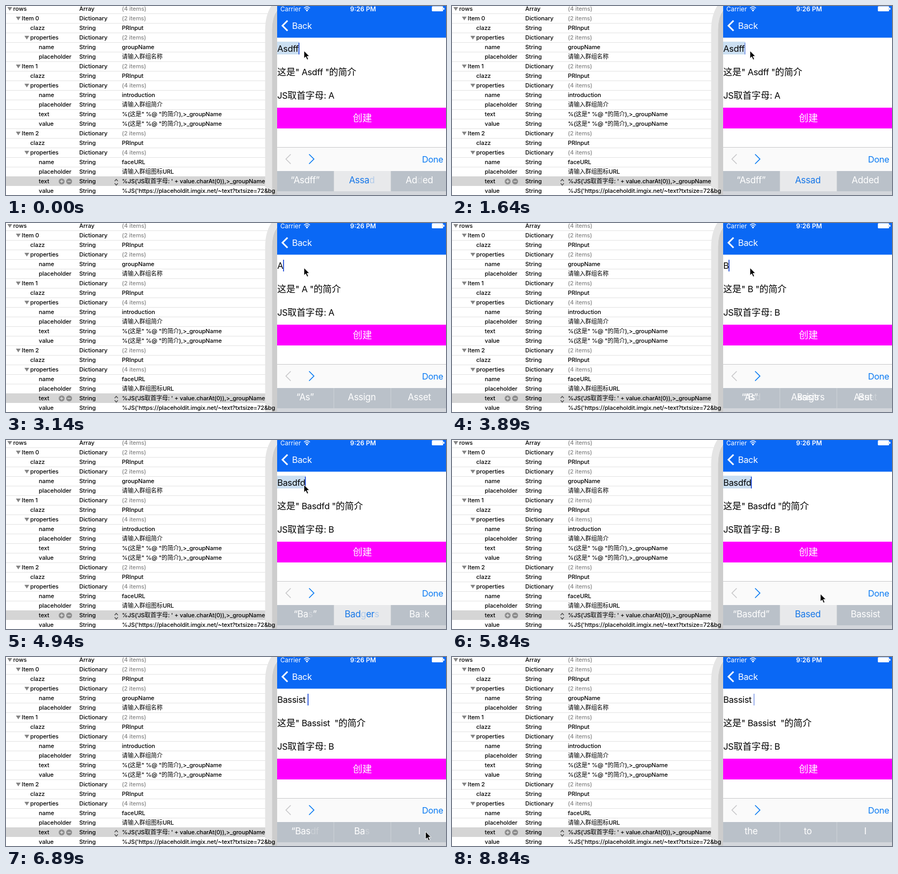
Recreate the animation shown at these times as an HTML page. Size 826 px wide and 355 px high, loop 8.94 s.

```html
<!DOCTYPE html>
<html lang="zh-CN">
<head>
<meta charset="utf-8">
<title>Form editor and live preview</title>
<style>
html, body { margin: 0; width: 100%; height: 100%; overflow: hidden; background: #fff; }
svg { display: block; width: 826px; height: 355px; }
text { font-family: Inter, "Noto Sans CJK SC", "Noto Sans CJK", "Noto Sans", sans-serif; white-space: pre; }
.list text { font-size: 11px; font-weight: 450; letter-spacing: -.1px; fill: #000; }
.list .dim { fill: #858585; }
.body { font-size: 16.4px; letter-spacing: -.3px; fill: #000; }
.word { font-size: 17px; letter-spacing: -.3px; text-anchor: middle; }
.cjk { font-size: 17px; letter-spacing: 0; }
</style>
</head>
<body>
<svg id="stage" viewBox="0 0 826 355" xmlns="http://www.w3.org/2000/svg"></svg>
<script>
const stage = document.getElementById('stage');

function add(tag, attrs, parent = stage, content) {
  const el = document.createElementNS('http://www.w3.org/2000/svg', tag);
  for (const k in attrs) el.setAttribute(k, attrs[k]);
  if (content !== undefined) el.textContent = content;
  parent.appendChild(el);
  return el;
}
const rect = (x, y, width, height, fill, parent) => add('rect', { x, y, width, height, fill }, parent);
const line = (d, stroke, w, parent) => add('path', { d, stroke, 'stroke-width': w, fill: 'none' }, parent);
const label = (x, y, str, attrs, parent) => add('text', { x, y, ...attrs }, parent, str);

// Property list: [depth, key, type, value]
const rows = [
  [0, 'rows', 'Array', '(4 items)'],
  [1, 'Item 0', 'Dictionary', '(2 items)'],
  [2, 'clazz', 'String', 'PRInput'],
  [2, 'properties', 'Dictionary', '(2 items)'],
  [3, 'name', 'String', 'groupName'],
  [3, 'placeholder', 'String', '请输入群组名称'],
  [1, 'Item 1', 'Dictionary', '(2 items)'],
  [2, 'clazz', 'String', 'PRInput'],
  [2, 'properties', 'Dictionary', '(4 items)'],
  [3, 'name', 'String', 'introduction'],
  [3, 'placeholder', 'String', '请输入群组简介'],
  [3, 'text', 'String', '%(这是" %@ "的简介),>_groupName'],
  [3, 'value', 'String', '%(这是" %@ "的简介),>_groupName'],
  [1, 'Item 2', 'Dictionary', '(2 items)'],
  [2, 'clazz', 'String', 'PRInput'],
  [2, 'properties', 'Dictionary', '(4 items)'],
  [3, 'name', 'String', 'faceURL'],
  [3, 'placeholder', 'String', '请输入群组图标URL'],
  [3, 'text', 'String', "%JS('JS取首字母: ' + value.charAt(0)),>_groupName"],
  [3, 'value', 'String', "%JS('https://placeholdit.imgix.net/~text?txtsize=72&bg"]
];
const picked = 18;

function drawList() {
  const g = add('g', { class: 'list' });
  rect(0, 0, 509, 355, '#fff', g);
  rows.forEach((_, i) => {
    const y = 5 + 18 * i;
    if (i === picked) rect(0, y - 9, 509, 18, '#d5d5d5', g);
    else rect(0, y + 9, 509, 1, '#e3e3e3', g);
  });
  // Device edge, under the text
  add('path', { d: 'M499 355V45Q499 22 509 8V355Z', fill: '#cdcdcd' }, g);
  line('M493 355V45Q493 12 511 -6', '#e5e5e5', 13, g);
  rows.forEach(([depth, key, type, value], i) => {
    const y = 5 + 18 * i, x = 13.6 + 16 * depth;
    if (type !== 'String')
      add('path', { d: `M${x - 11} ${y - 3}h9l-4.5 7z`, fill: '#858585' }, g);
    label(x, y + 4, key, {}, g);
    label(137.6, y + 4, type, {}, g);
    label(217.6, y + 4, value, type === 'String' ? {} : { class: 'dim' }, g);
  });
  for (const cx of [104.5, 118.5]) {
    add('circle', { cx, cy: 329.5, r: 5.5, fill: '#8c8c8c' }, g);
    line(`M${cx - 3} 329.5h6` + (cx < 110 ? `M${cx} 326.5v6` : ''), '#e2e2e2', 1.4, g);
  }
  line('M204 329l3-3.5l3 3.5M204 333l3 3.5l3-3.5', '#444', 1.2, g);
}

function drawPhone() {
  rect(509, 0, 317, 355, '#fff');
  rect(509, 0, 317, 59.5, '#0a68f5');
  label(515, 10, 'Carrier', { 'font-size': 11.8, fill: '#fff' });
  label(646, 10, '9:26 PM', { 'font-size': 12, 'font-weight': 600, fill: '#fff' });
  line('M559.5 4Q565 -1 570.5 4M561.6 6.3Q565 3.2 568.4 6.3', '#fff', 1.6);
  add('path', { d: 'M565 10.5l-2.2-2.5q2.2-1.8 4.4 0z', fill: '#fff' });
  add('rect', { x: 799.5, y: .5, width: 21, height: 9.5, rx: 1.5, fill: '#fff' });
  rect(821, 3.5, 2, 3.5, '#fff');
  line('M528.5 27.5L519 37L528.5 46.5', '#fff', 3);
  label(537, 43, 'Back', { class: 'body', style: 'fill:#fff' });
  rect(509, 191, 317, 39, '#f0f');
  label(669, 217, '创建', { 'font-size': 18, 'font-weight': 300, fill: '#fff', 'text-anchor': 'middle' });
  rect(509, 265, 317, 1, '#c9c9cb');
  rect(509, 266, 317, 44, '#fafafa');
  line('M534.5 278.5L525.5 287.5L534.5 296.5', '#c6c6c8', 1.5);
  line('M569 278.5L578 287.5L569 296.5', '#0b7bf3', 1.7);
  label(781, 294, 'Done', { class: 'body', style: 'fill:#0b7bf3' });
  rect(509, 348, 317, 7, '#d3d6db');
}

drawList();
drawPhone();

const mark = rect(509, 67, 0, 24, '#cbdff2');
const lines = [86, 130, 174].map(y => label(509.3, y, '', { class: 'body' }));
const caret = rect(0, 69, 2, 22, '#4166dc');
const cells = [[509, 106, 561.5], [615, 107, 668], [722, 104, 776]].map(([x, w, mid]) => ({
  bg: rect(x, 310, w, 38, '#bac1c9'), g: add('g', {}), mid
}));
rect(615, 310, 1, 38, '#cdd2d7');
rect(722, 310, 1, 38, '#cdd2d7');
const mouse = add('path', {
  d: 'M0 0V14.5L3.4 11.4L5.8 17L8.3 15.9L5.9 10.4H10.4Z',
  fill: '#000', stroke: '#fff', 'stroke-width': 1
});

// Each step lists only what changes. In words, "_" makes the next letter faint
// and "|" overlays two words.
const steps = [
  [0, { text: 'Asdff', fix: true, caret: 1, lit: [1], at: [559.3, 84], words: ['“Asdff”', 'Assa_d', 'Ad_ded'] }],
  [150, { words: ['“Asdff”', 'Assad', 'Added'] }],
  [590, { caret: .5 }],
  [740, { caret: 0 }],
  [1190, { caret: .5 }],
  [1340, { caret: 1 }],
  [1640, { caret: .5 }],
  [1790, { caret: 0 }],
  [2240, { caret: .5 }],
  [2390, { caret: 1 }],
  [2540, { text: 'Asdf', fix: false, lit: [], words: ['“Asdf_f”', 'Assa_d', 'Added'] }],
  [2690, { words: ['“Asdf ”', 'sadde_s_s', 'addered'] }],
  [2840, { text: 'Asd', words: ['“Asd_f”', 'sad', 'added'] }],
  [2990, { text: 'As', words: ['“As_d”', 'Assi_g_n', 'Ass_e_t'] }],
  [3140, { text: 'A', words: ['“As”', 'Assign', 'Asset'] }],
  [3290, { text: '', words: ['As_d', 'Assign', 'Asset'] }],
  [3440, { words: ['Asd', 'Assign', 'Asset'] }],
  [3890, { text: 'B', words: ['“B”|“As_d', 'Basis|Assigtrs', 'But|Ass_e_t'] }],
  [4040, { text: 'Ba', words: ['“B”', 'Basis', 'But'] }],
  [4190, { text: 'Bas', words: ['“Ba”', 'Ba_d', 'Ba_c_k'] }],
  [4340, { text: 'Basd', words: ['“Ba_s”', 'Badg_e_r_s', 'Bas_k'] }],
  [4490, { text: 'Basdf', words: ['“Bas”', 'Badgers', 'Bask'] }],
  [4940, { text: 'Basdfd', fix: true, lit: [1], words: ['“Ba_s”', 'Bad_ger_s', 'Ba_sk'] }],
  [5090, { words: ['“Basd_f_d”', 'Bas_e_d', 'Bass_i_s_t'] }],
  [5240, { caret: .5, at: [574, 104], words: ['“Basdfd”', 'Based', 'Bassist'] }],
  [5390, { caret: 0, at: [606, 158] }],
  [5540, { at: [648, 222] }],
  [5690, { caret: .5, at: [681, 271] }],
  [5840, { caret: 1, at: [691.5, 289] }],
  [5990, { at: [715, 299] }],
  [6140, { at: [758, 317] }],
  [6290, { caret: .5, at: [787.5, 328] }],
  [6440, { caret: 0 }],
  [6740, { caret: .5, lit: [2] }],
  [6890, { text: 'Bassist ', fix: false, caret: 1, lit: [], words: ['“Bas_d_f', 'Ba_s', 'I'] }],
  [7040, { words: ['t_h_e', 't_o', 'I'] }],
  [7190, { words: ['the', 'to', 'I'] }],
  [7340, { caret: .5 }],
  [7490, { caret: 0 }],
  [7790, { caret: .5, at: [792, 345] }],
  [7940, { caret: 1, at: null }],
  [8390, { caret: .5 }],
  [8540, { caret: 0 }],
  [8840, { caret: .5 }]
];
const LOOP = 8940;
let sum = {};
const poses = steps.map(([, change]) => (sum = { ...sum, ...change }));

function setMixed(el, str) {
  el.textContent = '';
  for (const part of str.match(/[\u4e00-\u9fff]+|[^\u4e00-\u9fff]+/g) || [])
    add('tspan', part[0] >= '\u4e00' && part[0] <= '\u9fff' ? { class: 'cjk' } : {}, el, part);
}

function setWords(cell, spec, lit) {
  cell.bg.setAttribute('fill', lit ? '#e8e9eb' : '#bac1c9');
  cell.g.textContent = '';
  for (const word of spec.split('|')) {
    const t = label(cell.mid, 333, undefined, { class: 'word', fill: lit ? '#1777e8' : '#fff' }, cell.g);
    for (const run of word.match(/_.|[^_]+/g))
      add('tspan', { 'fill-opacity': run[0] === '_' ? .25 : 1 }, t, run.replace('_', ''));
  }
}

function draw(p) {
  setMixed(lines[0], p.text);
  setMixed(lines[1], `这是" ${p.text} "的简介`);
  setMixed(lines[2], 'JS取首字母: ' + p.text.charAt(0));
  const w = p.text ? lines[0].getComputedTextLength() : 0;
  mark.setAttribute('width', p.fix ? w + 1.5 : 0);
  caret.setAttribute('x', Math.round(508.8 + w));
  caret.setAttribute('opacity', p.caret);
  cells.forEach((c, i) => setWords(c, p.words[i], p.lit.includes(i)));
  mouse.setAttribute('visibility', p.at ? 'visible' : 'hidden');
  if (p.at) mouse.setAttribute('transform', `translate(${p.at})`);
}

let shown = -1;
const start = performance.now();
function tick() {
  const t = (performance.now() - start) % LOOP;
  let i = steps.length - 1;
  while (steps[i][0] > t) i--;
  if (i !== shown) draw(poses[shown = i]);
  requestAnimationFrame(tick);
}
tick();
</script>
</body>
</html>
```
